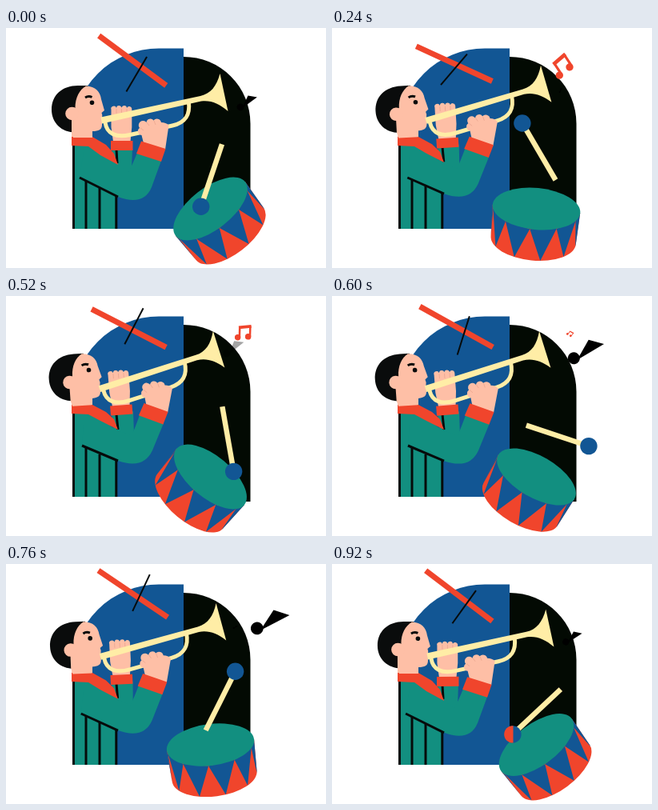
Recreate the animation shown at these times as an HTML page. Size 400 px wide and 300 px high, loop 960 ms.

```html
<!DOCTYPE html>
<html lang="en">
<head>
<meta charset="utf-8">
<title>Trumpet and drum</title>
<style>
html, body { margin: 0; width: 100%; height: 100%; overflow: hidden; background: #fff; }
svg { display: block; width: 100vw; height: 100vh; }
.blue { fill: #125694; }
.green { fill: #128f80; }
.red { fill: #f0452c; }
.skin { fill: #febfa6; }
.gold { fill: #ffeda6; }
.ink { fill: #0a0c0c; }
.line { fill: none; stroke: #060a0a; stroke-width: 3; }
.brass { fill: none; stroke: #ffeda6; stroke-width: 5; }
.crease { fill: none; stroke: #eaa68f; stroke-width: .8; }
.note path { fill: none; stroke: #f0452c; }
.note circle { fill: #f0452c; }
</style>
</head>
<body>
<svg viewBox="0 0 400 300">
  <defs>
    <clipPath id="west"><rect width="226.5" height="300"/></clipPath>
    <g id="single"><circle r="8"/><path d="M5 0V-31L25.500 -36.500" stroke-width="5.500"/></g>
  </defs>
  <path class="blue" d="M83 251V133A108 108 0 0 1 191 25.500H222V251Z"/>
  <path fill="#030a03" d="M222 36A83.500 83.500 0 0 1 305.500 119.500V257H222Z"/>

  <path id="bar" d="M-52.300 0H52.300" stroke="#f0452c" stroke-width="7"/>
  <path id="rod" d="M0 -25.300V25.300" stroke="#060a0a" stroke-width="2"/>

  <path class="green" d="M83 140H105L139 170V251H83Z"/>
  <path class="line" d="M84.500 144V251M100 190V251M117 198V251M137.800 206V251"/>
  <path id="farSleeve" class="green"/>
  <path id="seam" class="line"/>
  <path id="arm" class="green"/>
  <path id="fold" class="line"/>
  <path class="skin" d="M82 112H108V138H82Z"/>
  <path id="collar" class="red"/>

  <g id="head">
    <path class="ink" d="M57 102C57 84 70 72 90 72H102L110 108L88 130.500C70 131 57 119 57 102Z"/>
    <path class="skin" d="M100 72.500C92 77 86.500 87 86.500 100H82V130L84 137H108V129C116 129 120 127 120 121V113Q121 109 119.500 106L123 103L119 89C118 80 112 73 100 72.500Z"/>
    <circle class="skin" cx="82.500" cy="107" r="8.300"/>
    <circle class="ink" cx="107.500" cy="93.300" r="2.800"/>
    <path class="line" d="M99 87Q103 84.500 107.500 86.500"/>
  </g>

  <g id="farHand">
    <path class="skin" d="M131.500 102A3.400 3.400 0 0 1 138 100A3.300 3.300 0 0 1 144.500 99.500A3.300 3.300 0 0 1 151 100A3.300 3.300 0 0 1 157.300 101V124L155.500 142H134L131.500 124Z"/>
    <path class="crease" d="M138 101V107M144.500 101V107M151 101V107"/>
    <path class="red" d="M131 141H158.500V153H131Z"/>
  </g>

  <g id="horn">
    <path class="brass" d="M124 118C126 132 137 137.500 155 133.500L208 122C225 118 230.500 108 228.300 92"/>
    <path class="gold" d="M118.500 111.500L243 85C256 82 263 73 267.500 57L277.500 104C266 94 256 90 244 91.500L120 119.500Z"/>
  </g>

  <g id="hand">
    <path class="skin" d="M172 144L169.500 134A5 5 0 0 1 167 125A5 5 0 0 1 175.500 118A5 5 0 0 1 184.500 115.500A5.500 5.500 0 0 1 194 118Q200 118 203.500 121.500L199 152Z"/>
    <path class="crease" d="M168 125L172 128M176 118L179 122M185 116L187 121"/>
    <path class="red" d="M169 141.500L199.500 151L194 167L163 157Z"/>
  </g>

  <g id="drum"></g>
  <path id="stick" d="M-41 0H41" stroke="#ffeda6" stroke-width="6.500"/>
  <circle id="ball" class="blue" r="10.700"/>
  <g clip-path="url(#west)"><circle id="ballWest" class="red" r="10.700"/></g>

  <g class="note" id="rise"><use href="#single"/></g>
  <g class="note" id="pair">
    <circle cx="-11.500" cy="11.300" r="6"/><circle cx="9.300" cy="9.200" r="6"/>
    <path d="M-8 11V-10M13 9V-12" stroke-width="4"/><path d="M-10 -8.700L15 -11.800" stroke-width="6"/>
  </g>
  <g class="note" id="soar"><use href="#single"/></g>
</svg>

<script>
const LOOP = 960, STEP = 40, PEAK = 475;
const $ = id => document.getElementById(id);
const set = (id, name, value) => $(id).setAttribute(name, value);
const mix = (a, b, k) => a + (b - a) * k;
const wave = (t, peak, n = 1) => Math.cos(2 * Math.PI * n * (t - peak) / LOOP);
const place = (id, x, y, turn, size = 1) =>
  set(id, 'transform', `translate(${x} ${y}) rotate(${turn}) scale(${size})`);
const swing = (id, k, dx, dy, turn, cx, cy) =>
  set(id, 'transform', `translate(${dx * k} ${dy * k}) rotate(${turn * k} ${cx} ${cy})`);

// Each shape leans from its first outline to its second
const cloth = {
  farSleeve: ['M132 150L158 150L157 176L145 190L134 170Z', 'M132 146L159 144L160 172L145 190L135 170Z'],
  seam: ['M138 152L139 169', 'M138 148L140 167'],
  arm: ['M92 187L98 148L118 159L139 170L153 180Q158 171 164 156L194 166L182 199Q172 223 140 211Z',
    'M95 187L98 148L118 156L140 168L157 174Q161 166 167 149L197 159L183 193Q172 217 140 206Z'],
  fold: ['M92 187L140 211', 'M95 187L140 206'],
  collar: ['M82 136L108 136L125 146L135 157L140 171L118 159L103 148L82 147Z',
    'M82 136L108 136L125 145L135 154L140 167L118 156L103 148L82 147Z']
};

function blend(from, to, k) {
  const ends = to.match(/[\d.]+/g);
  let i = 0;
  return from.replace(/[\d.]+/g, v => mix(+v, +ends[i++], k));
}

function drawMan(t) {
  const k = 1 - ((1 - wave(t, PEAK)) / 2) ** 2;
  for (const id in cloth) set(id, 'd', blend(...cloth[id], k));
  swing('head', k, 0, 0, -4, 95, 150);
  swing('farHand', k, -.5, -4.5, -4.5, 145, 147);
  swing('horn', k, -2.4, .5, -5.5, 120, 115);
  swing('hand', k, 3, -7, 2.5, 181, 154);
}

function drawBars(t) {
  place('bar', 155.5 - 3.8 * wave(t, 360), 41 + 3.7 * wave(t, 250),
    30 - 6.6 * wave(t, 380) + 1.3 * wave(t, 0, 2));
  place('rod', 160.5 - 8.5 * wave(t, 290), 47 + 9.5 * wave(t, 0, 3) + 5 * wave(t, 200),
    28 + 11 * wave(t, 80) + 10 * wave(t, 200, 3));
}

// The stick twirls forward between the hits, then back with a pause on the way
function stickTurn(t) {
  const low = -71.4, high = 260, hit = 520, back = 430;
  if (t <= hit) return mix(low, high, (t / hit) ** 1.2);
  const u = Math.min(1, (t - hit) / back);
  return mix(high, low, u - .22 * Math.sin(Math.PI * u * u) ** 3);
}

function drawDrum(t) {
  place('drum', 255.5, 226, 3 + 39.5 * wave(t, PEAK) - 1.3 * wave(t, PEAK, 2));
  const turn = stickTurn(t), a = turn * Math.PI / 180;
  const x = 267 + 15 * wave(t, 540) + 4.5 * wave(t, 30, 3);
  const y = 171.5 + 9.5 * wave(t, 0, 2) + 8 * wave(t, 780);
  place('stick', x, y, turn);
  for (const id of ['ball', 'ballWest']) {
    set(id, 'cx', x - 41.3 * Math.cos(a));
    set(id, 'cy', y - 41.3 * Math.sin(a));
  }
}

function buildDrum() {
  const rx = 55, ry = 26, high = 39.5;
  const rim = (deg, low) => {
    const a = deg * Math.PI / 180, s = low ? .97 : 1;
    return `${rx * s * Math.cos(a)} ${ry * s * Math.sin(a) + (low ? high : 0)}`;
  };
  let tri = `M${rim(24)}L${rim(0)}L${rim(0, 1)}L${rim(6, 1)}ZM${rim(168)}L${rim(180)}L${rim(180, 1)}Z`;
  for (let a = 24; a < 168; a += 36) tri += `M${rim(a)}L${rim(a + 36)}L${rim(a + 18, 1)}Z`;
  $('drum').innerHTML =
    `<path class="red" d="M${rim(180)}L${rim(180, 1)}A${rx * .97} ${ry * .97} 0 0 0 ${rim(0, 1)}L${rim(0)}Z"/>
     <path class="blue" d="${tri}"/><ellipse class="green" rx="${rx}" ry="${ry}"/>`;
}

// A note swells and shrinks over its life; u is its age from 0 to 1
const notes = {
  rise: { born: 720, life: 520, pose(u, puff) {
    return [282 + 11 * puff, 74 + 25 * puff, mix(34, -10, u * u), .55 * puff];
  } },
  pair: { born: 80, life: 560, pose(u, puff) {
    return [mix(276, 298, u) + 6 * puff, mix(54, 48, u) - 7 * puff, mix(-34, 60, u ** 4), puff];
  } },
  soar: { born: 480, life: 420, pose(u, puff) {
    const out = 1 - (1 - u) ** 5;
    return [251 + 63 * out, 66 + 14.5 * out, 15 + 18 * out, 1.06 * Math.sqrt(puff)];
  } }
};

function drawNotes(t) {
  for (const id in notes) {
    const { born, life, pose } = notes[id];
    const u = (t - born + LOOP) % LOOP / life;
    const alive = u > 0 && u < 1;
    set(id, 'visibility', alive ? 'visible' : 'hidden');
    if (alive) place(id, ...pose(u, Math.sin(Math.PI * u)));
    if (id === 'soar') set(id, 'opacity', Math.min(1, 3.7 * u));
  }
}

buildDrum();
const start = performance.now();
function tick() {
  const now = (performance.now() - start) % LOOP;
  const t = Math.floor(now / STEP) * STEP;
  drawMan(t);
  drawBars(t);
  drawDrum(t);
  drawNotes(t);
  requestAnimationFrame(tick);
}
tick();
</script>
</body>
</html>
```
